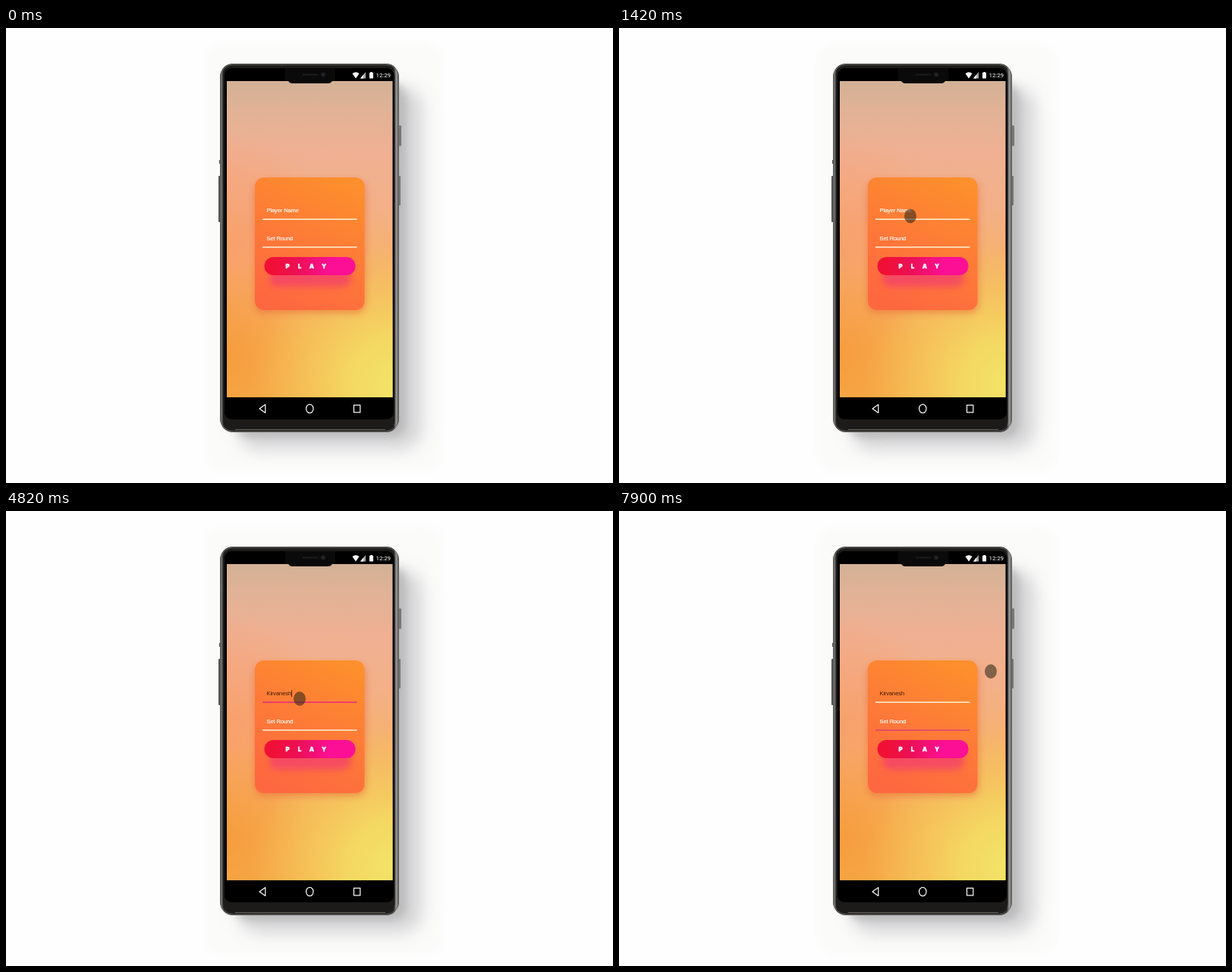
An HTML page for the animation above (8000 ms loop, 800 by 600 pixels).

```html
<!DOCTYPE html>
<html lang="en">
<head>
<meta charset="utf-8">
<title>Player form</title>
<style>
  html, body { margin: 0; width: 100%; height: 100%; overflow: hidden; background: #fefefe; }
  svg { display: block; width: 800px; height: 600px; }
  text { font: 7.5px "Liberation Sans", Arial, sans-serif; letter-spacing: -.1px; fill: #fff; }
  .label { stroke: #fff; stroke-width: .15; }
  #name { fill: #3a1a08; }
  .play { font: 900 8px Inter, "Liberation Sans", sans-serif; letter-spacing: 0; text-anchor: middle; stroke: #fff; stroke-width: .3; }
  .clock { font: 8px Roboto, sans-serif; letter-spacing: -.1px; }
</style>
</head>
<body>
<svg viewBox="0 0 800 600">
  <defs>
    <linearGradient id="sky" x1="0" y1="0" x2="0" y2="1">
      <stop offset="0" stop-color="#d3b196"/>
      <stop offset=".1" stop-color="#e2b296"/>
      <stop offset=".22" stop-color="#efb093"/>
      <stop offset=".4" stop-color="#f4b087"/>
      <stop offset=".6" stop-color="#f6b168"/>
      <stop offset=".8" stop-color="#f6b152"/>
      <stop offset="1" stop-color="#f6ae48"/>
    </linearGradient>
    <radialGradient id="sun" gradientUnits="userSpaceOnUse" cx="515" cy="470" r="190">
      <stop offset="0" stop-color="#f2e567"/>
      <stop offset=".35" stop-color="#f4db64" stop-opacity=".9"/>
      <stop offset="1" stop-color="#f6c660" stop-opacity="0"/>
    </radialGradient>
    <radialGradient id="glow" gradientUnits="userSpaceOnUse" cx="285" cy="285" r="150">
      <stop offset="0" stop-color="#f99a68" stop-opacity=".75"/>
      <stop offset="1" stop-color="#f99a68" stop-opacity="0"/>
    </radialGradient>
    <radialGradient id="amber" gradientUnits="userSpaceOnUse" cx="285" cy="430" r="120">
      <stop offset="0" stop-color="#f6963a" stop-opacity=".8"/>
      <stop offset="1" stop-color="#f6963a" stop-opacity="0"/>
    </radialGradient>
    <linearGradient id="card" x1=".75" y1="0" x2=".35" y2="1">
      <stop offset="0" stop-color="#fd8f2c"/>
      <stop offset=".5" stop-color="#fd7b37"/>
      <stop offset="1" stop-color="#fe6840"/>
    </linearGradient>
    <linearGradient id="button">
      <stop offset=".1" stop-color="#f01036"/>
      <stop offset=".38" stop-color="#ec1058"/>
      <stop offset=".72" stop-color="#fc0f94"/>
    </linearGradient>
    <linearGradient id="rim">
      <stop offset="0" stop-color="#333"/>
      <stop offset=".008" stop-color="#777"/>
      <stop offset=".02" stop-color="#222"/>
      <stop offset=".97" stop-color="#222"/>
      <stop offset=".985" stop-color="#999"/>
      <stop offset="1" stop-color="#444"/>
    </linearGradient>
    <filter id="soft" x="-50%" y="-50%" width="200%" height="200%"><feGaussianBlur stdDeviation="5"/></filter>
    <filter id="softer" x="-50%" y="-50%" width="200%" height="200%"><feGaussianBlur stdDeviation="11"/></filter>
    <clipPath id="screen"><path d="M291 70H509.500V487H291Z"/></clipPath>
  </defs>

  <!-- shadow on the table -->
  <rect x="262" y="20" width="314" height="566" rx="24" fill="#fbfbfa" filter="url(#soft)"/>
  <rect x="306" y="78" width="242" height="478" rx="28" fill="#b4b4b8" opacity=".55" filter="url(#softer)"/>
  <rect x="300" y="72" width="228" height="468" rx="20" fill="#999" opacity=".4" filter="url(#soft)"/>

  <!-- phone body -->
  <g fill="#555">
    <rect x="280" y="195" width="3" height="61" rx="1"/>
    <rect x="281" y="174" width="2" height="5"/>
    <rect x="517" y="128.500" width="4" height="27" rx="1" fill="#777"/>
    <rect x="517.500" y="195" width="2.500" height="39" rx="1" fill="#777"/>
  </g>
  <rect x="282" y="47" width="236" height="486" rx="17" fill="url(#rim)"/>
  <rect x="283" y="48" width="234" height="484" rx="16" fill="none" stroke="#77756f" stroke-width=".9"/>
  <rect x="286" y="50.500" width="226.500" height="479" rx="13" fill="#1c1b19"/>
  <rect x="288" y="53" width="223" height="463" rx="9" fill="#000"/>
  <path d="M302 529.500H500" stroke="#66615c"/>

  <g clip-path="url(#screen)">
    <g id="wall">
      <rect x="291" y="70" width="219" height="417" fill="url(#sky)"/>
      <rect x="291" y="70" width="219" height="417" fill="url(#glow)"/>
      <rect x="291" y="70" width="219" height="417" fill="url(#amber)"/>
      <rect x="291" y="70" width="219" height="417" fill="url(#sun)"/>
    </g>
    <rect x="327" y="202" width="147" height="174" rx="12" fill="#e8703c" opacity=".6" filter="url(#soft)"/>
    <rect x="328" y="197" width="144.500" height="175" rx="12" fill="url(#card)"/>
    <rect x="347" y="317" width="108" height="24" rx="12" fill="#f0307c" opacity=".6" filter="url(#soft)"/>
    <rect x="340.500" y="302" width="120" height="24" rx="12" fill="url(#button)"/>
    <text class="play" x="371 387 403 419" y="317.300">PLAY</text>
    <path id="line1" d="M338 252.300H462.500" stroke-width="1.500"/>
    <path id="line2" d="M338 289H462.500" stroke-width="1.500"/>
    <text id="hint" class="label" x="343.500" y="243.300">Player Name</text>
    <text class="label" x="343.500" y="279.500">Set Round</text>
    <text id="name" x="343.500" y="243.300"></text>
    <rect id="caret" width=".9" height="9" fill="#3a1a08"/>
    <ellipse id="touch" rx="7.800" ry="9.200" fill="#2a2418" fill-opacity=".56" stroke="#2a2418" stroke-opacity=".15"/>
  </g>

  <!-- notch and status bar -->
  <path d="M368 69.500Q372 69.500 373 71Q374 73 379 73H423Q428 73 429 71Q430 69.500 434 69.500V53H368Z" fill="#0b0a0a"/>
  <path d="M391 61.500H411" stroke="#1d1b1b" stroke-width="2"/>
  <circle cx="418" cy="61.500" r="2.800" fill="#25222a"/>
  <g fill="#fff">
    <path d="M456.500 60Q461 56.500 465.500 60L461 66.500Z"/>
    <path d="M467 66.500L474 58V66.500Z" fill="#aaa"/>
    <path d="M467 66.500L471 61.600V66.500Z"/>
    <path d="M479 59H480.200V58H482.800V59H484V66.500H479Z"/>
    <text class="clock" x="487.500" y="65.300">12:29</text>
  </g>

  <!-- navigation bar -->
  <g fill="none" stroke="#fff" stroke-width="1.200">
    <path d="M341.800 496.500V507.500L334 502Z" stroke-linejoin="round"/>
    <ellipse cx="400.300" cy="502" rx="4.700" ry="5.700"/>
    <rect x="458.500" y="497.300" width="8.300" height="9.600"/>
  </g>
</svg>
<script>
const LOOP = 8000, NAME = "Kirvanesh";
const KEYS = [2840, 3120, 3360, 3620, 3880, 4140, 4380, 4600, 4820];
const FOCUS_NAME = 2000, FOCUS_ROUND = 6320, FADE = 350;
const CREAM = [255, 242, 218], PINK = [232, 42, 130], PURPLE = [200, 38, 150];
// time, x, y of the touch point
const PATH = [
  [660, 508, 152], [840, 454, 162], [1080, 412, 196], [1300, 381, 241], [1420, 384, 248],
  [1540, 384, 248], [1740, 387, 247.500], [5780, 387, 247.500], [6020, 406, 286],
  [6360, 406, 286], [6600, 440, 256], [6980, 490, 211.500]
];
const $ = id => document.getElementById(id);
const mix = (a, b, k) => a + (b - a) * k;
const ramp = (t, start, length) => Math.min(1, Math.max(0, (t - start) / length));
const blend = (a, b, k) => `rgb(${a.map((v, i) => Math.round(mix(v, b[i], k)))})`;

function touchAt(t) {
  const i = PATH.findIndex(p => p[0] > t);
  if (i < 0) return PATH[PATH.length - 1].slice(1);
  const a = PATH[i - 1], b = PATH[i], k = ramp(t, a[0], b[0] - a[0]);
  return [mix(a[1], b[1], k), mix(a[2], b[2], k)];
}

function draw(t) {
  const touch = $("touch"), caret = $("caret"), name = $("name");
  const typed = KEYS.filter(k => k <= t).length;
  name.textContent = NAME.slice(0, typed);
  $("hint").style.display = typed ? "none" : "";

  const inName = ramp(t, FOCUS_NAME, FADE), inRound = ramp(t, FOCUS_ROUND, FADE);
  $("line1").setAttribute("stroke", blend(CREAM, PINK, inName - inRound));
  $("line2").setAttribute("stroke", blend(CREAM, PURPLE, inRound));
  $("line2").setAttribute("stroke-width", mix(1.5, 1.1, inRound));

  // the caret restarts its blink at each key or focus
  const second = t >= FOCUS_ROUND;
  const since = second ? FOCUS_ROUND : typed ? KEYS[typed - 1] : FOCUS_NAME;
  const on = t >= since && (t - since) % 1000 < 500;
  const width = second || !typed ? 0 : name.getComputedTextLength();
  caret.style.display = on ? "" : "none";
  caret.setAttribute("x", 343.5 + width);
  caret.setAttribute("y", second ? 272.5 : 236.3);

  touch.style.display = t < PATH[0][0] ? "none" : "";
  if (t >= PATH[0][0]) {
    const [x, y] = touchAt(t);
    touch.setAttribute("cx", x);
    touch.setAttribute("cy", y);
  }
}

const start = performance.now();
function tick() {
  draw((performance.now() - start) % LOOP);
  requestAnimationFrame(tick);
}
tick();
</script>
</body>
</html>
```
